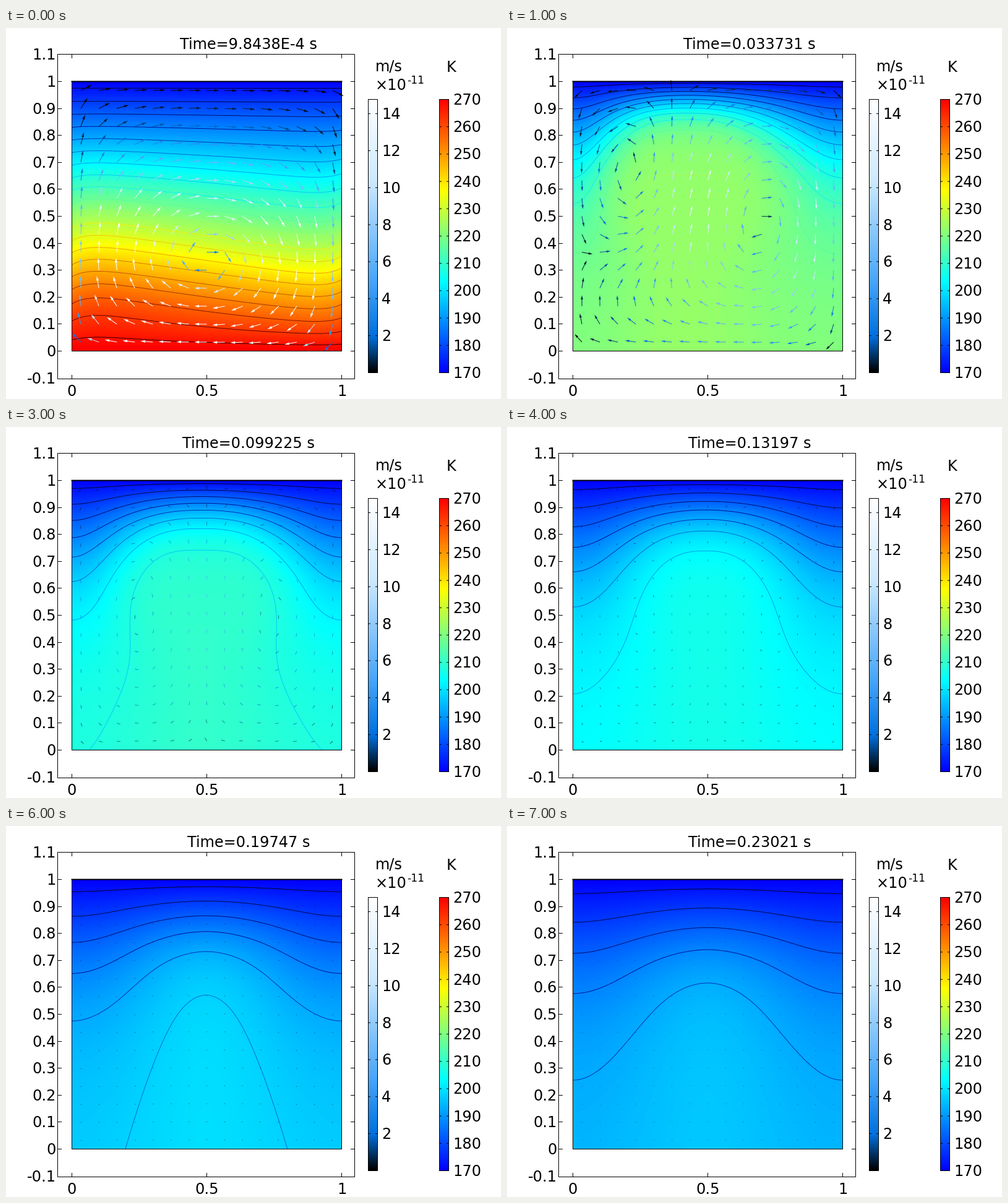
These frames come from a looping animation (800 px wide and 600 px high, 8000 ms). A matplotlib script:

```python
import numpy as np
import matplotlib.pyplot as plt
from matplotlib.animation import FuncAnimation
from matplotlib.colors import LinearSegmentedColormap

FRAMES = 8
X0, X1, Y0, Y1 = 106.5, 542.5, 522.5, 86.5      # unit square in pixels
LEVELS = 172.5 + 5 * np.arange(20)

heat = LinearSegmentedColormap.from_list(
    "heat", ["#0000ff", "#00ffff", "#ffff00", "#ff0000"], N=512)
flow = LinearSegmentedColormap.from_list("flow", [
    (0, "#000000"), (0.13, "#0070dd"), (0.33, "#46a5fa"),
    (0.7, "#cde9ff"), (1, "#ffffff")], N=512)
isotherm = LinearSegmentedColormap.from_list("isotherm", [
    (0, "#000000"), (0.2, "#000aa0"), (0.3, "#0082eb"), (0.42, "#00f0ff"),
    (0.5, "#80ff80"), (0.58, "#ffeb00"), (0.7, "#eb8200"),
    (0.9, "#6e0000"), (1, "#000000")], N=512)

axis = np.linspace(0, 1, 437)
GX, GY = np.meshgrid(axis, axis)
cells = (np.arange(15) + .5) / 15
AX, AY = np.meshgrid(cells, cells)


def to_px(x, y):
    return X0 + x * (X1 - X0), Y0 + y * (Y1 - Y0)


def lean(i):
    """How far the rising plume still tilts to one side."""
    return .16 * .5 ** i


def roll(y):
    return y * (1 - y) ** 2


def saturate(u, n):
    return u / (1 + u ** n) ** (1 / n)


def start_field():
    base = 270 - 100 * GY + 2.5 * np.exp(-((GY - .2) / .15) ** 2)
    wave = (1 - 2 * GX - .6 * np.exp(-GX / .06)
            + .6 * np.exp(-(1 - GX) / .06))
    return base + 54 * roll(GY) * wave


def plume_field(i):
    rise = np.interp(i, [1, 2, 3, 5, 7], [53, 47.5, 40, 32.2, 26.3])
    depth = 1 - GY
    centre = rise * saturate(depth / (.15 + .0045 * i * i), 4)
    wall = (rise - 1.5) * saturate(depth / (.4 + .017 * i), 3)
    bulge = 2.5 * np.exp(-(i / 3.6) ** 4) * np.exp(-((GY - .6) / .2) ** 2)
    xs = GX + lean(i) * np.sin(np.pi * GX)
    mix = ((1 + np.cos(2 * np.pi * xs)) / 2) ** (.95 + bulge)
    return 170 + centre + (wall - centre) * mix


def stream(x, y, i):
    if i == 0:
        return -np.sin(np.pi * x) * roll(y)
    if i == 1:
        # a small cell in the upper left corner turns against the main one
        d = (x / .37) ** 3 + ((1 - y) / .64) ** 3 - 1
        return -np.sin(np.pi * x) * np.sin(np.pi * y) * d / (6 + d)
    xs = x + lean(i) * np.sin(np.pi * x) * (1 - y)
    return np.sin(2 * np.pi * xs) * np.sin(np.pi * y)


def velocity(x, y, i, h=1e-3):
    u = stream(x, y + h, i) - stream(x, y - h, i)
    v = stream(x - h, y, i) - stream(x + h, y, i)
    return u / (2 * h), v / (2 * h)


def speed(x, y, mag, i):
    wall = 1 - np.exp(-x * (1 - x) / .08)
    if i == 0:
        return 48 * mag * wall * np.minimum(1, 2 * (1 - y)) ** 1.7
    ends = np.minimum(1, (1 - y) / .35) * np.minimum(1, (y + .08) / .35)
    return 42 * .5 ** i * mag / mag.max() * wall * ends


def clock(i):
    t = 9.8438e-4 + i * 0.03274687
    text = f"{t:.4E}".replace("E-0", "E-") if t < .001 else f"{t:.5g}"
    return f"Time={text} s"


fig = plt.figure(figsize=(8, 6), dpi=100, facecolor="white")
ax = fig.add_axes([0, 0, 1, 1])
ax.axis("off")


def label(x, y, s, ha="left", px=24):
    return ax.text(x, y, s, ha=ha, va="baseline", fontsize=px * .72,
                   family="DejaVu Sans", color="black")


def line(xs, ys, width=1):
    ax.plot(xs, ys, color="black", lw=width * .72, zorder=5, snap=False,
            solid_capstyle="projecting", solid_joinstyle="miter")


def box(l, t, r, b):
    line([l, r, r, l, l], [t, t, b, b, t])


def colorbar(l, cmap, ticks, lo, hi):
    r, t, b = l + 15, 115.5, 557.5
    ax.imshow(np.linspace(1, 0, 442)[:, None], cmap=cmap, aspect="auto",
              extent=(l, r, b, t), vmin=0, vmax=1)
    box(l, t, r, b)
    for v in ticks:
        y = b - (v - lo) / (hi - lo) * (b - t)
        line([l, l + 3], [y, y])
        line([r - 3, r], [y, y])
        label(l + 21.5, y + 8.5, str(v))


L, R, T, B = 83.5, 563.5, 42.5, 567.5
box(L, T, R, B)
for k in range(-1, 12):
    y = to_px(0, k / 10)[1]
    label(81, y + 8.5, f"{k / 10:g}", "right")
    if 0 <= k <= 10:
        y = np.floor(y) + .5
        line([L, L + 6], [y, y])
        line([R - 6, R], [y, y])
for v in (0, .5, 1):
    x = to_px(v, 0)[0]
    label(x, 595, f"{v:g}", "center")
    x = np.floor(x) + .5
    line([x, x], [T, T + 6])
    line([x, x], [B - 6, B])
box(X0, Y1, X1, Y0)
line([X0, X1], [Y1, Y1], 2)

label(597, 69, "m/s")
label(597, 100, "×10")
label(648, 90, "-11", px=17)
label(712, 71, "K")
colorbar(585.5, flow, range(2, 15, 2), 0, 14.77)
colorbar(700.5, heat, range(170, 271, 10), 170, 270)

title = label(392, 34, "", "center")
image = ax.imshow(np.zeros((437, 437)), cmap=heat, vmin=170, vmax=270,
                  extent=(X0, X1, Y0, Y1), origin="lower", aspect="auto")
moving = []


def draw_arrows(i):
    u, v = velocity(AX, AY, i)
    mag = np.hypot(u, v) + 1e-9
    size = 20 / (1 + (i / 2.2) ** 2.5)
    head = max(1, .38 * size)
    tint = flow(np.clip(speed(AX, AY, mag, i) / 14.77, 0, 1))
    return ax.quiver(
        *to_px(AX, AY), size * u / mag, -size * v / mag,
        color=tint.reshape(-1, 4), angles="xy", scale_units="xy", scale=1,
        units="xy", width=np.clip(size / 12, .55, 1), minlength=.3,
        headwidth=max(1.2, .2 * size), headlength=head,
        headaxislength=head, zorder=3)


def draw(i):
    while moving:
        moving.pop().remove()
    field = plume_field(i) if i else start_field()
    image.set_data(field)
    title.set_text(clock(i))
    moving.append(ax.contour(*to_px(GX, GY), field, levels=LEVELS,
                             colors=isotherm((LEVELS - 170) / 100),
                             linewidths=.65, zorder=2))
    moving.append(draw_arrows(i))
    ax.set_xlim(0, 800)
    ax.set_ylim(600, 0)
    return [image, title]


anim = FuncAnimation(fig, draw, frames=FRAMES, interval=1000,
                     init_func=lambda: [image, title], repeat=True,
                     repeat_delay=0, blit=False)
plt.show()
```
